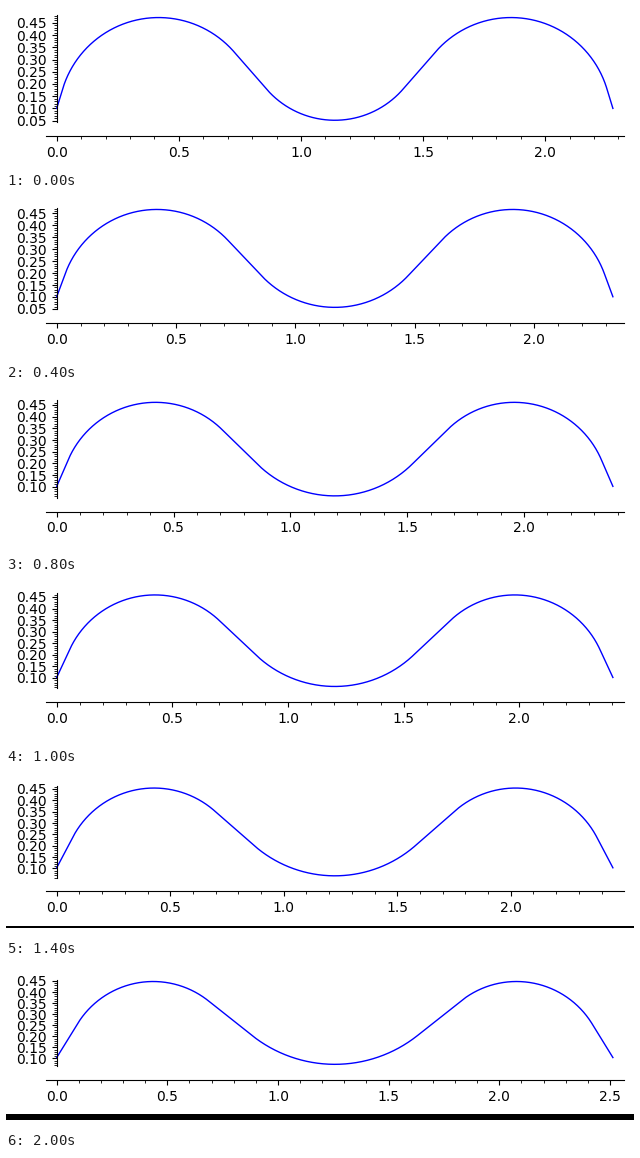
Recreate the animation shown at these times as a matplotlib script. Size 628 by 164 pixels, loop 2200 ms.

```python
import numpy as np
import matplotlib.pyplot as plt
from matplotlib.animation import FuncAnimation
from matplotlib.patches import Rectangle
from matplotlib.ticker import AutoMinorLocator, FormatStrFormatter, MultipleLocator

W, H, DPI = 628, 164, 100
FRAMES, STEP = 11, 200
X0 = 50.7             # pixel column of x = 0
SPAN = 556.2          # pixel width available to the curve
MAX_SCALE_25 = 222.3  # scale at which the "2.5" label touches the margin
MARGIN = 0.02
OUTWARD = 10          # points between the plot and the x axis
BAR_END = 154

# half width, end height, crest, trough, crest radius, trough radius,
# slope angle between crest and trough, slope angle at the ends
START = np.array([1.1386, 0.100, 0.4720, 0.0515, 0.41, 0.37, 48.9, 73.0])
END = np.array([1.2568, 0.104, 0.4477, 0.0734, 0.40, 0.60, 38.5, 58.4])


def curve(i):
    """Symmetric wave of circular arcs joined by straight tangents."""
    t = i / (FRAMES - 1)
    p = t + 0.15 * t * (1 - t)
    half, y0, crest, trough, r_top, r_low, mid, end = START + (END - START) * p
    mid, end = np.radians([mid, end])

    # Straight parts make up the height the arcs leave over.
    l_end = (crest - y0 - r_top * (1 - np.cos(end))) / np.sin(end)
    l_mid = (crest - trough - (r_top + r_low) * (1 - np.cos(mid))) / np.sin(mid)

    nodes = np.cumsum([0, l_end, r_top * (end + mid), l_mid, r_low * mid])
    s = np.linspace(0, nodes[-1], 600)
    angle = np.interp(s, nodes, [end, end, -mid, -mid, 0])
    angle = (angle[1:] + angle[:-1]) / 2
    x = np.append(0, np.cumsum(np.cos(angle))) * s[1]
    y = np.append(0, np.cumsum(np.sin(angle))) * s[1] + y0
    x *= half / x[-1]
    return np.append(x, 2 * half - x[::-1]), np.append(y, y[::-1])


plt.rcParams["toolbar"] = "None"
fig = plt.figure(figsize=(W / DPI, H / DPI), dpi=DPI, facecolor="white")

ax = fig.add_axes([0.1, 0.2, 0.8, 0.7])
ax.patch.set_visible(False)
ax.spines[["right", "top"]].set_visible(False)
ax.spines["left"].set_position(("data", 0))
ax.spines["bottom"].set_position(("outward", OUTWARD))
for axis, step, fmt in ((ax.xaxis, 0.5, "%.1f"), (ax.yaxis, 0.05, "%.2f")):
    axis.set_major_locator(MultipleLocator(step))
    axis.set_minor_locator(AutoMinorLocator(5))
    axis.set_major_formatter(FormatStrFormatter(fmt))
line, = ax.plot([], [], color="blue", lw=1)

stage = fig.add_axes([0, 0, 1, 1], zorder=5)
stage.set(xlim=(0, W), ylim=(H, 0))
stage.axis("off")
bar, edge = (stage.add_patch(Rectangle((0, 0), 1, 1, fc="black", ec="none",
                                       antialiased=False)) for _ in range(2))
edge.set_bounds(W - 1, 0, 1, BAR_END)


def draw(i):
    x, y = curve(i)
    line.set_data(x, y)

    x_pad = MARGIN * x[-1]
    y_pad = MARGIN * np.ptp(y)
    right = x[-1] + x_pad
    low, high = y.min() - y_pad, y.max() + y_pad

    scale = SPAN / x[-1]
    capped = right >= 2.5 and scale > MAX_SCALE_25
    if capped:
        scale = MAX_SCALE_25

    # The top margin is set by the axis tip or by the 0.45 label.
    y45 = max(15, 9.5 + (high - 0.45) * scale)
    bottom = y45 + (0.45 - low) * scale
    ax.set_position([(X0 - x_pad * scale) / W, 1 - bottom / H,
                     (right + x_pad) * scale / W, (high - low) * scale / H])
    ax.set(xlim=(-x_pad, right), ylim=(low, high))

    # Black shows where the shrinking plot no longer covers the canvas.
    bar_top = round(bottom + OUTWARD * DPI / 72 + 34.1)
    bar.set_bounds(0, bar_top, W, max(BAR_END - bar_top, 0))
    bar.set_visible(bar_top < BAR_END)
    edge.set_visible(capped)
    return line, bar, edge


anim = FuncAnimation(fig, draw, frames=FRAMES, interval=STEP,
                     init_func=lambda: draw(0), repeat=True, repeat_delay=0)
plt.show()
```
